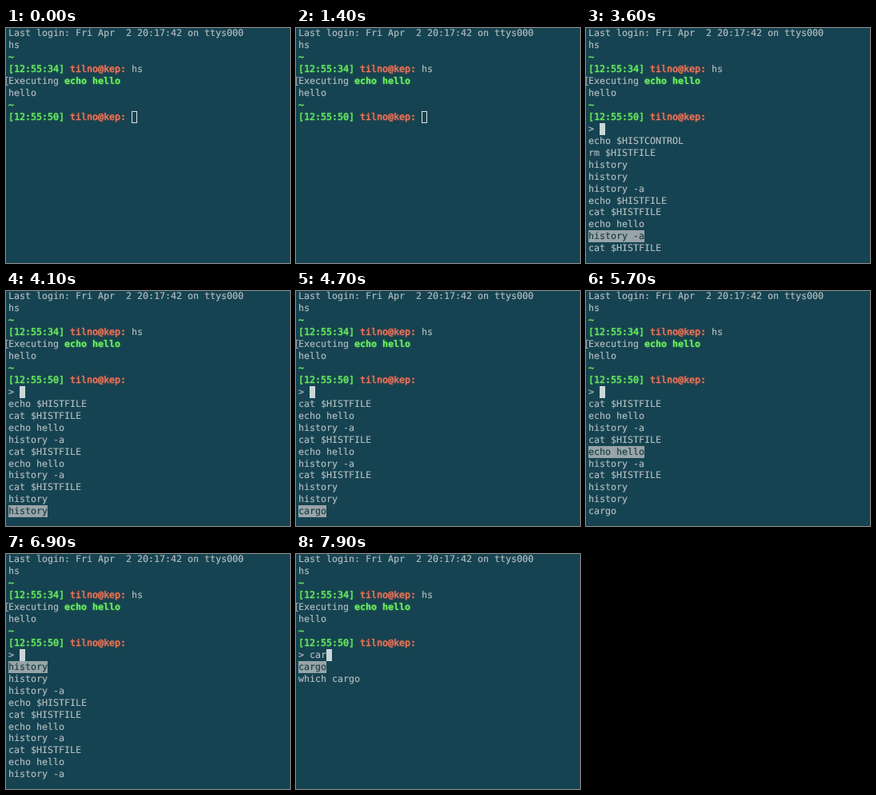
Animation of 355x294 px, one loop 8000 ms. Source, as an HTML page:

```html
<!DOCTYPE html>
<html lang="en">
<head>
<meta charset="utf-8">
<title>History search</title>
<style>
  :root { --bg: #164351; --fg: #b4bfc1; --row: 14.95px; }
  html, body { margin: 0; width: 100%; height: 100%; overflow: hidden; background: var(--bg); }
  #term {
    position: absolute; left: 3px; top: -0.6px; width: 352px;
    color: var(--fg);
    font: 11.63px/var(--row) "DejaVu Sans Mono", "Liberation Mono", monospace;
    text-rendering: geometricPrecision;
    -webkit-text-stroke: 0.15px;
  }
  #term div { height: var(--row); white-space: pre; }
  .ok, .who { -webkit-text-stroke: 0.4px; }
  .ok { color: #6bf060; text-shadow: 0 0 3px #4fc05a80; }
  .cmd { color: #6bf060; font-weight: bold; text-shadow: 0 0 3px #4fc05a80; }
  .who { color: #f47a5c; text-shadow: 0 0 3px #d8483ab0; }
  .mark {
    position: absolute; left: -3px; top: 61.6px; width: 2px; height: 9px;
    border: 1px solid #98a5a9; border-right: 0;
  }
  .cursor {
    display: inline-block; box-sizing: border-box; vertical-align: top;
    width: 7px; height: var(--row); background: #cbd6d9;
  }
  .cursor.hollow { background: none; border: 1px solid #dbe3e5; }
  .sel { display: inline-block; vertical-align: top; height: var(--row); background: #98a4a7; color: #173c48; }
</style>
</head>
<body>
<div id="term">
  <div>Last login: Fri Apr  2 20:17:42 on ttys000</div>
  <div>hs</div>
  <div class="ok">~</div>
  <div><span class="ok">[12:55:34]</span> <span class="who">tilno@kep:</span> hs</div>
  <div><i class="mark"></i>Executing <span class="cmd">echo hello</span></div>
  <div>hello</div>
  <div class="ok">~</div>
  <div><span class="ok">[12:55:50]</span> <span class="who">tilno@kep:</span> <i class="cursor hollow" id="idle"></i></div>
  <div id="query"></div>
  <section id="list"></section>
</div>
<script>
  const LOOP = 8000, TICK = 100, ROWS = 10;
  const OPEN = 1600, DOWN = 2500, UP = 4900;
  const DELAY = 500, REPEAT = 90;
  const LAST = 15, STOP = 2;
  const KEYS = [[7300, "c"], [7500, "a"], [7600, "r"]];
  const HISTORY = [
    "echo $HISTCONTROL", "rm $HISTFILE", "history", "history", "history -a",
    "echo $HISTFILE", "cat $HISTFILE", "echo hello", "history -a",
    "cat $HISTFILE", "echo hello", "history -a", "cat $HISTFILE",
    "history", "history", "cargo", "which cargo"
  ];
  const byId = id => document.getElementById(id);
  const idle = byId("idle"), query = byId("query"), list = byId("list");

  // Steps made by a held key: one at once, then repeats after a delay.
  function held(t, start) {
    if (t < start) return 0;
    const since = t - start - DELAY;
    return since < 0 ? 1 : 2 + Math.floor(since / REPEAT);
  }

  function stateAt(t) {
    const text = KEYS.filter(([at]) => t >= at).map(([, key]) => key).join("");
    if (text) {
      return { text, items: HISTORY.filter(c => c.includes(text)), sel: 0, top: 0 };
    }
    const down = Math.min(held(t, DOWN), LAST);
    const sel = Math.max(down - held(t, UP), Math.min(down, STOP));
    const lowest = Math.max(0, down - ROWS + 1);
    return { text, items: HISTORY, sel, top: Math.min(lowest, sel) };
  }

  function line(text, selected) {
    const row = document.createElement("div");
    const span = document.createElement("span");
    span.textContent = text;
    if (selected) span.className = "sel";
    row.append(span);
    return row;
  }

  function render(t) {
    const open = t >= OPEN;
    idle.style.visibility = open ? "hidden" : "visible";
    query.textContent = "";
    list.textContent = "";
    if (!open) return;
    const { text, items, sel, top } = stateAt(t);
    const cursor = document.createElement("i");
    cursor.className = "cursor";
    query.append("> " + text, cursor);
    list.append(...items.slice(top, top + ROWS).map((c, i) => line(c, top + i === sel)));
  }

  let shown = -1;
  function frame() {
    const t = Math.floor((performance.now() % LOOP) / TICK) * TICK;
    if (t !== shown) render(shown = t);
    requestAnimationFrame(frame);
  }
  frame();
</script>
</body>
</html>
```
